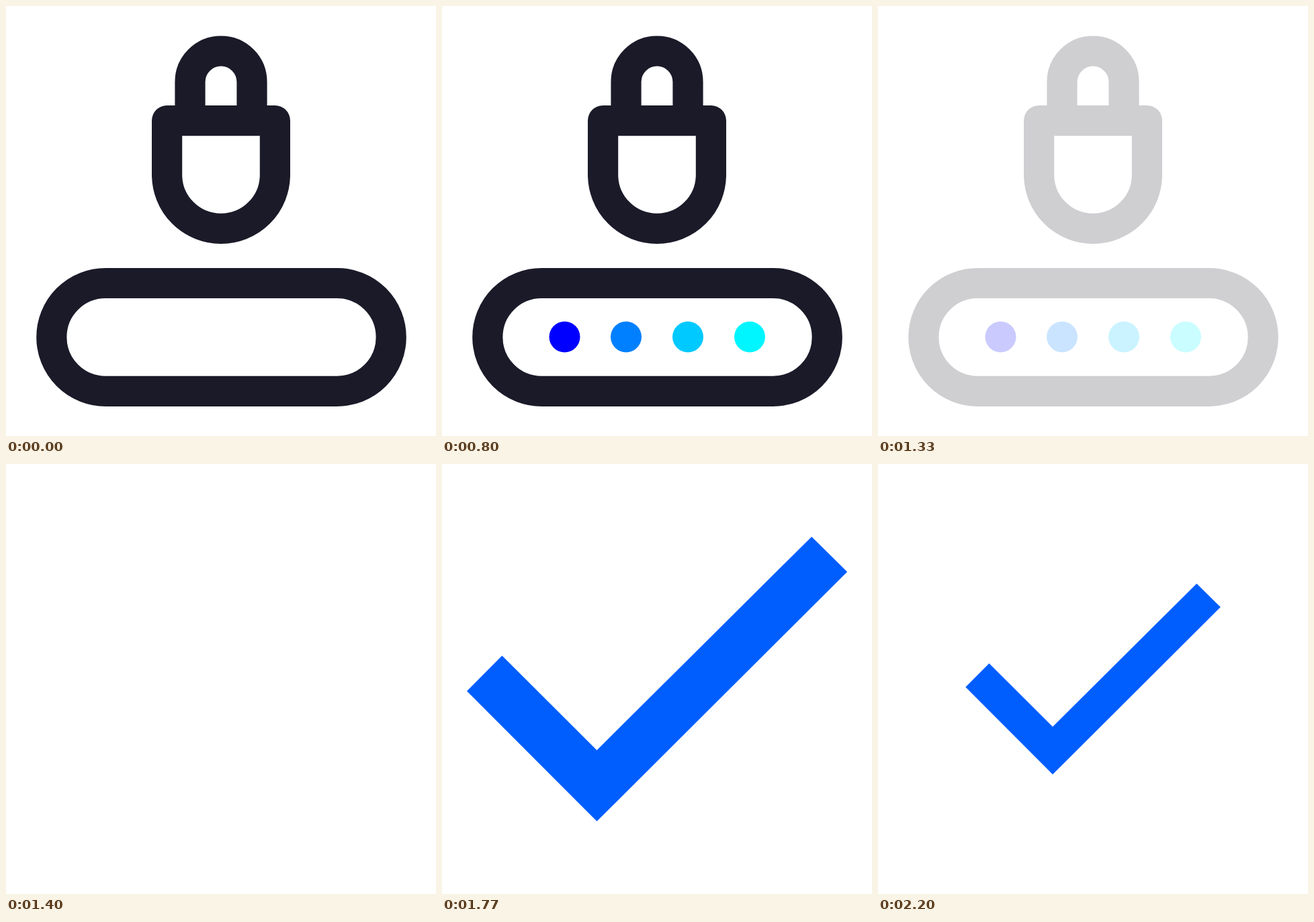
An HTML page for the animation above (2.81 s loop, 640 by 640 pixels).

```html
<!DOCTYPE html>
<html lang="en">
<head>
<meta charset="utf-8">
<title>Password accepted</title>
<style>
  html, body { margin: 0; width: 100%; height: 100%; overflow: hidden; background: #fff; }
  svg { display: block; width: 100%; height: 100%; }
</style>
</head>
<body>
<svg viewBox="0 0 640 640">
  <g id="login" fill="none" stroke="#1b1a29" stroke-width="45.2" stroke-linejoin="round">
    <path d="M274 165V113a46 46 0 0 1 92 0V165"/>
    <path d="M239.6 170.6H400.4V251a80.4 80.4 0 0 1-160.8 0Z"/>
    <rect x="67.8" y="412.5" width="505.4" height="160.8" rx="80.4"/>
    <g id="dots" stroke="none">
      <circle cx="182.5" cy="492.5" r="23" fill="#00f"/>
      <circle cx="274" cy="492.5" r="23" fill="#0080ff"/>
      <circle cx="366" cy="492.5" r="23" fill="#00c9ff"/>
      <circle cx="458" cy="492.5" r="23" fill="#00f6ff"/>
    </g>
  </g>
  <path id="check" fill="#005eff" d="M130.3 332L165.4 296.7L260 391L474.3 178L509.8 213L260 462Z"/>
</svg>
<script>
  const LOOP = 2810, PEAK = 0.61;
  const dotStarts = [45, 265, 492, 692];
  const login = document.getElementById('login');
  const dots = [...document.getElementById('dots').children];
  const check = document.getElementById('check');

  // Linear progress from 0 to 1 between two times
  const ramp = (t, from, to) => Math.min(1, Math.max(0, (t - from) / (to - from)));

  function draw(t) {
    dots.forEach((dot, i) => dot.setAttribute('opacity', ramp(t, dotStarts[i], dotStarts[i] + 107)));
    login.setAttribute('opacity', 1 - ramp(t, 1197, 1365));
    check.setAttribute('opacity', ramp(t, 1402, 1485));
    const scale = 1 + PEAK * (ramp(t, 1505, 1835) - ramp(t, 1835, 2172));
    check.setAttribute('transform', `translate(320 320) scale(${scale}) translate(-320 -320)`);
  }

  const start = performance.now();
  function tick() {
    draw((performance.now() - start) % LOOP);
    requestAnimationFrame(tick);
  }
  draw(0);
  requestAnimationFrame(tick);
</script>
</body>
</html>
```
